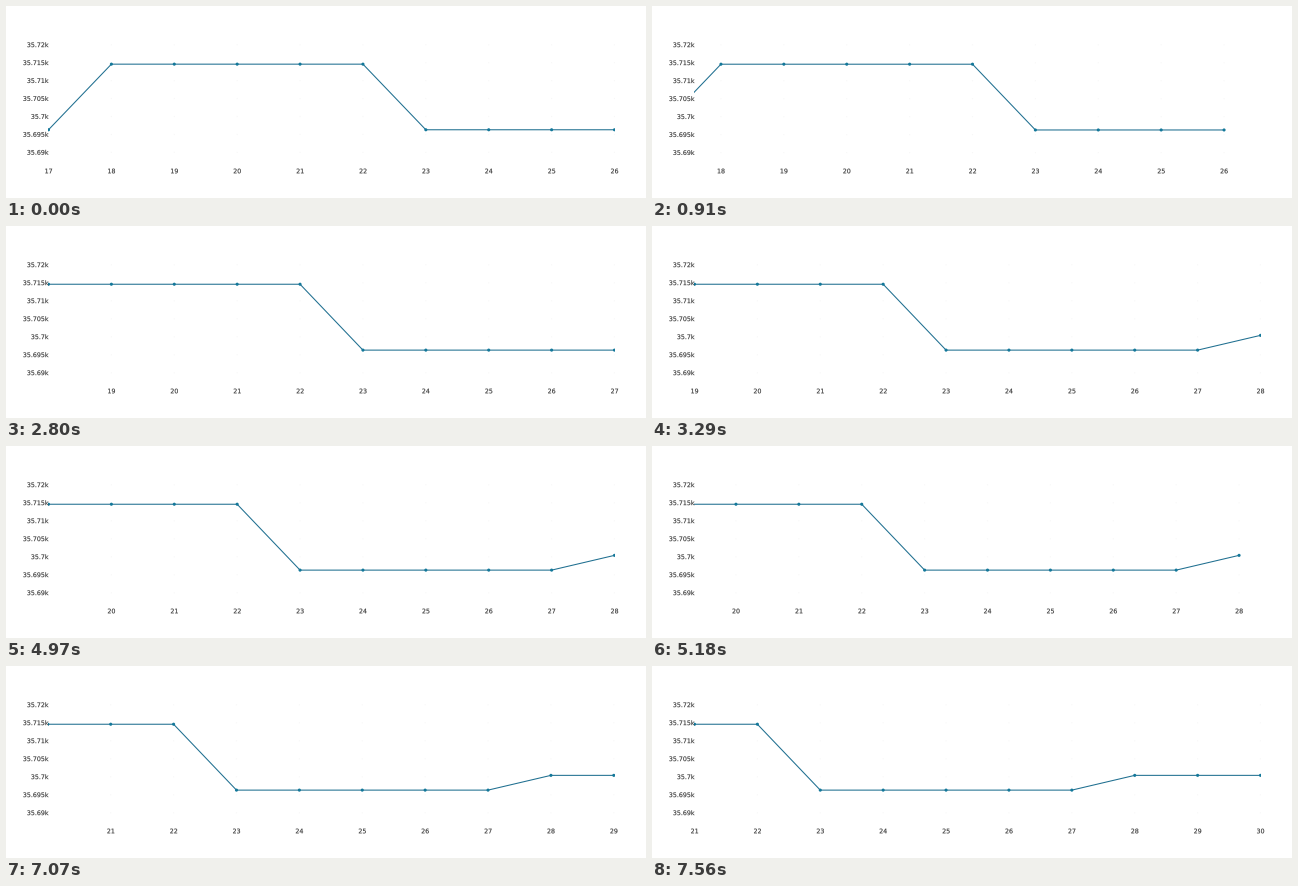
Write a matplotlib script that moves like this. It is 640 px wide and 192 px high and loops after 8120 ms.

```python
import numpy as np
import matplotlib.pyplot as plt
from matplotlib.animation import FuncAnimation
from matplotlib.patches import PathPatch, Rectangle
from matplotlib.textpath import TextPath
from matplotlib.transforms import Affine2D

W, H, DPI = 640, 192, 100
STEP, LOOP = 70, 8120
PX = 72 / DPI

LEFT, RIGHT = 42.5, 608.5
GAP = (RIGHT - LEFT) / 9
FIRST, LAST = 17, 30
TICKS = np.arange(FIRST, LAST + 1)
VALUES = np.select([TICKS == 17, TICKS <= 22, TICKS <= 27],
                   [35.6963, 35.7146, 35.6963], 35.7004)
LEVELS = [35.72, 35.715, 35.71, 35.705, 35.7, 35.695, 35.69]

# each slide: first changed picture, start of the easing, settled
SLIDES = [(630, 646, 1190), (2800, 2785, 3290),
          (4970, 4960, 5530), (7000, 7000, 7560)]
EASE_MS = 500


def ease(u):
    u = min(max(u, 0), 1)
    return 4 * u ** 3 if u < 0.5 else 1 - 4 * (1 - u) ** 3


def state(t):
    """Left edge of the axis, first and last visible tick."""
    left, lo, hi = FIRST, FIRST, FIRST + 9
    for i, (begin, start, end) in enumerate(SLIDES):
        if t < begin:
            break
        left = FIRST + i + (1 if t >= end else ease((t - start) / EASE_MS))
        lo += 1
        hi += t >= end
    return left, lo, hi


def y_pos(value, left):
    # the vertical axis stretches slightly during the first slide
    scale = 3585 + 15 * min(left - FIRST, 1)
    return 38.8 + (35.72 - value) * scale


fig = plt.figure(figsize=(W / DPI, H / DPI), dpi=DPI, facecolor="white")
ax = fig.add_axes([0, 0, 1, 1])
ax.set_xlim(0, W)
ax.set_ylim(H, 0)
ax.axis("off")


def label(text, align):
    path = TextPath((0, 0), text, size=6.3, prop={"family": "DejaVu Sans"})
    width = path.get_extents().x1
    patch = PathPatch(path, fc="#333333", ec="#333333", lw=0.12 * PX,
                      snap=False, zorder=5)
    patch.shift = -width * align
    ax.add_patch(patch)
    return patch


def place(patch, x, y):
    move = Affine2D().scale(1, -1).translate(x + patch.shift, y + 2.3)
    patch.set_transform(move + ax.transData)


x_labels = [label(str(n), 0.52) for n in TICKS]
y_labels = [label(f"{v:g}k", 1) for v in LEVELS]

clip = Rectangle((42, 0), 567, H, transform=ax.transData)
n_grid = len(TICKS) * len(LEVELS)
grid = ax.scatter(np.zeros(n_grid), np.zeros(n_grid), s=[(1.2 * PX) ** 2] * n_grid,
                  c="#f7f7f7", linewidths=0, zorder=1)
line, = ax.plot([], [], color="#1f6f90", lw=1.05 * PX, snap=False,
                solid_joinstyle="round", zorder=3)
dots = ax.scatter(TICKS, VALUES, s=[(3.1 * PX) ** 2] * len(TICKS),
                  c="#13789a", linewidths=0, zorder=4)
for artist in (grid, line, dots):
    artist.set_clip_path(clip)


def draw(frame):
    left, lo, hi = state(frame * STEP)
    xs = LEFT + (TICKS - left) * GAP
    ys = y_pos(VALUES, left)
    rows = [y_pos(v, left) for v in LEVELS]

    for n, x, patch in zip(TICKS, xs, x_labels):
        patch.set_visible(lo <= n <= hi)
        place(patch, x, 165)
    for y, patch in zip(rows, y_labels):
        place(patch, LEFT, y)

    known = TICKS <= hi
    line.set_data(xs[known], ys[known])
    dots.set_offsets(np.column_stack([xs, ys])[known])
    shown = xs[(TICKS >= lo) & known]
    grid.set_offsets([(x, y) for x in shown for y in rows])
    return [line, dots, grid, *x_labels, *y_labels]


anim = FuncAnimation(fig, draw, frames=LOOP // STEP, interval=STEP,
                     repeat=True, blit=False)
plt.show()
```
